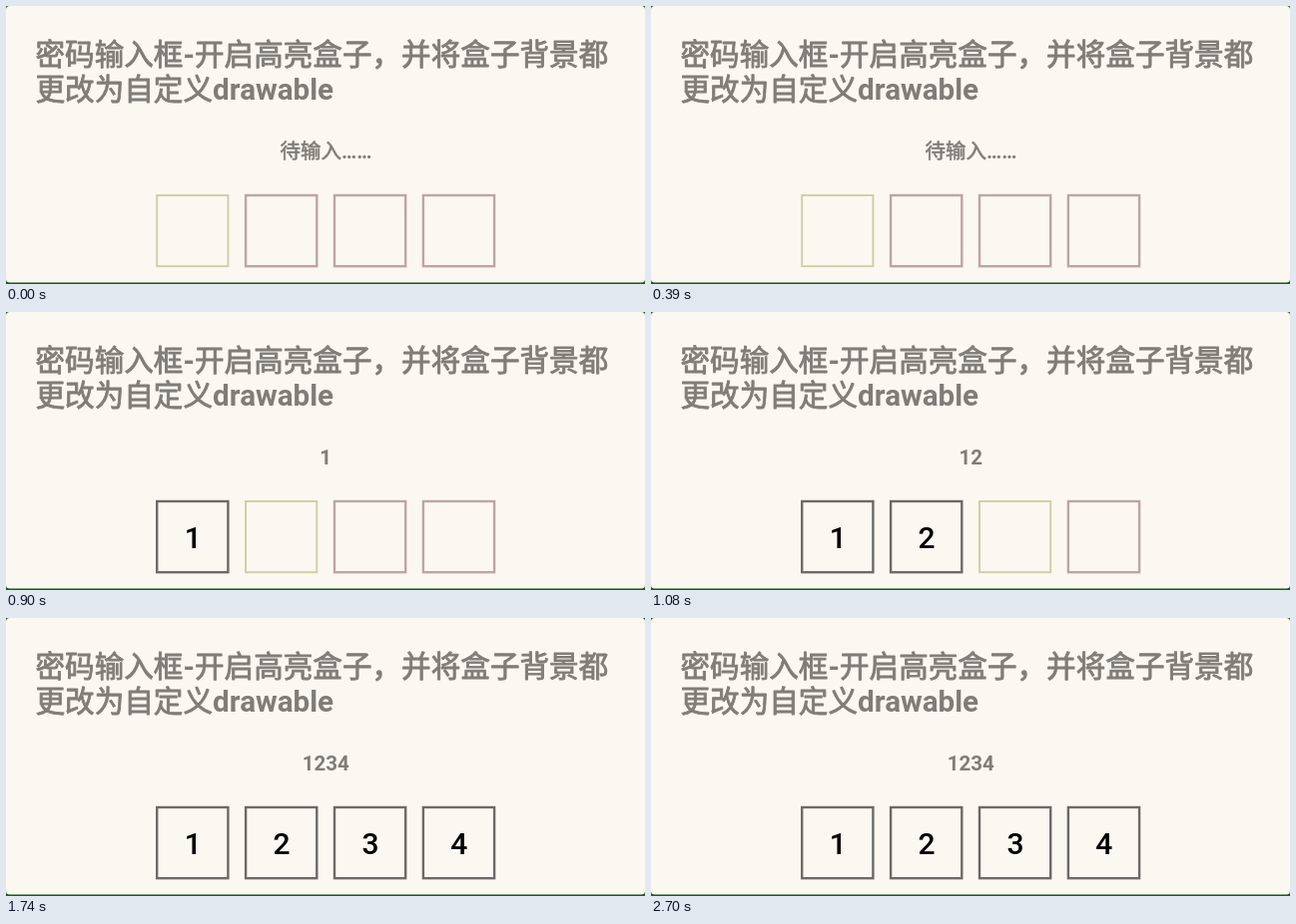
Recreate the animation shown at these times as an HTML page. Size 640 px wide and 279 px high, loop 2.76 s.

```html
<!DOCTYPE html>
<html lang="zh-CN">
<meta charset="utf-8">
<style>
  html, body { margin: 0; width: 100%; height: 100%; overflow: hidden; background: #14581a; }
  svg { display: block; }
  text { font-family: Roboto, "Noto Sans CJK SC", "Noto Sans CJK", sans-serif; font-weight: 700; fill: #807d78; }
  .title { font-size: 29.6px; }
  .status { font-size: 20.5px; text-anchor: middle; }
  .digit { font-size: 30px; font-weight: 500; fill: #000; text-anchor: middle; }
  .cjk { font-weight: 400; stroke: #807d78; stroke-width: .03em; stroke-linejoin: round; }
  rect.box { fill: none; }
</style>
<svg width="640" height="279" viewBox="0 0 640 279">
  <rect width="640" height="277.6" rx="3.5" fill="#fbf8f1"/>
  <text class="title" x="29.5" y="58.8"><tspan class="cjk">密码输入框</tspan>-<tspan class="cjk">开启高亮盒子，并将盒子背景都</tspan></text>
  <text class="title" x="29.5" y="93.8"><tspan class="cjk">更改为自定义</tspan>drawable</text>
  <text class="status" id="hint" x="320.5" y="153.3"><tspan class="cjk">待输入</tspan>……</text>
  <text class="status" id="typed" x="320.2" y="153.3"></text>
  <g id="boxes"></g>
</svg>
<script>
const LOOP = 2760;
// [start time in ms, digits entered]
const steps = [[0, 0], [630, 1], [960, 2], [1290, 3], [1650, 4], [1950, 3], [2250, 4]];
const $ = id => document.getElementById(id);

function add(tag, attrs) {
  const el = document.createElementNS('http://www.w3.org/2000/svg', tag);
  for (const key in attrs) el.setAttribute(key, attrs[key]);
  return $('boxes').appendChild(el);
}

const cells = [0, 1, 2, 3].map(i => {
  const x = 151.2 + i * 88.9;
  return {
    box: add('rect', { class: 'box', x, y: 190, width: 71.2, height: 71.2 }),
    digit: add('text', { class: 'digit', x: x + 36, y: 236.6 })
  };
});

function show(count) {
  $('hint').style.display = count ? 'none' : '';
  $('typed').textContent = '1234'.slice(0, count);
  cells.forEach(({ box, digit }, i) => {
    const color = i < count ? '#6b6a68' : i === count ? '#cfcea6' : '#c0a3a2';
    box.setAttribute('stroke', color);
    box.setAttribute('stroke-width', i === count ? 1.9 : 2.4);
    digit.textContent = i < count ? i + 1 : '';
  });
}

const origin = performance.now();
function frame() {
  const t = (performance.now() - origin) % LOOP;
  show(steps.filter(([start]) => start <= t).pop()[1]);
  requestAnimationFrame(frame);
}
frame();
</script>
</html>
```
